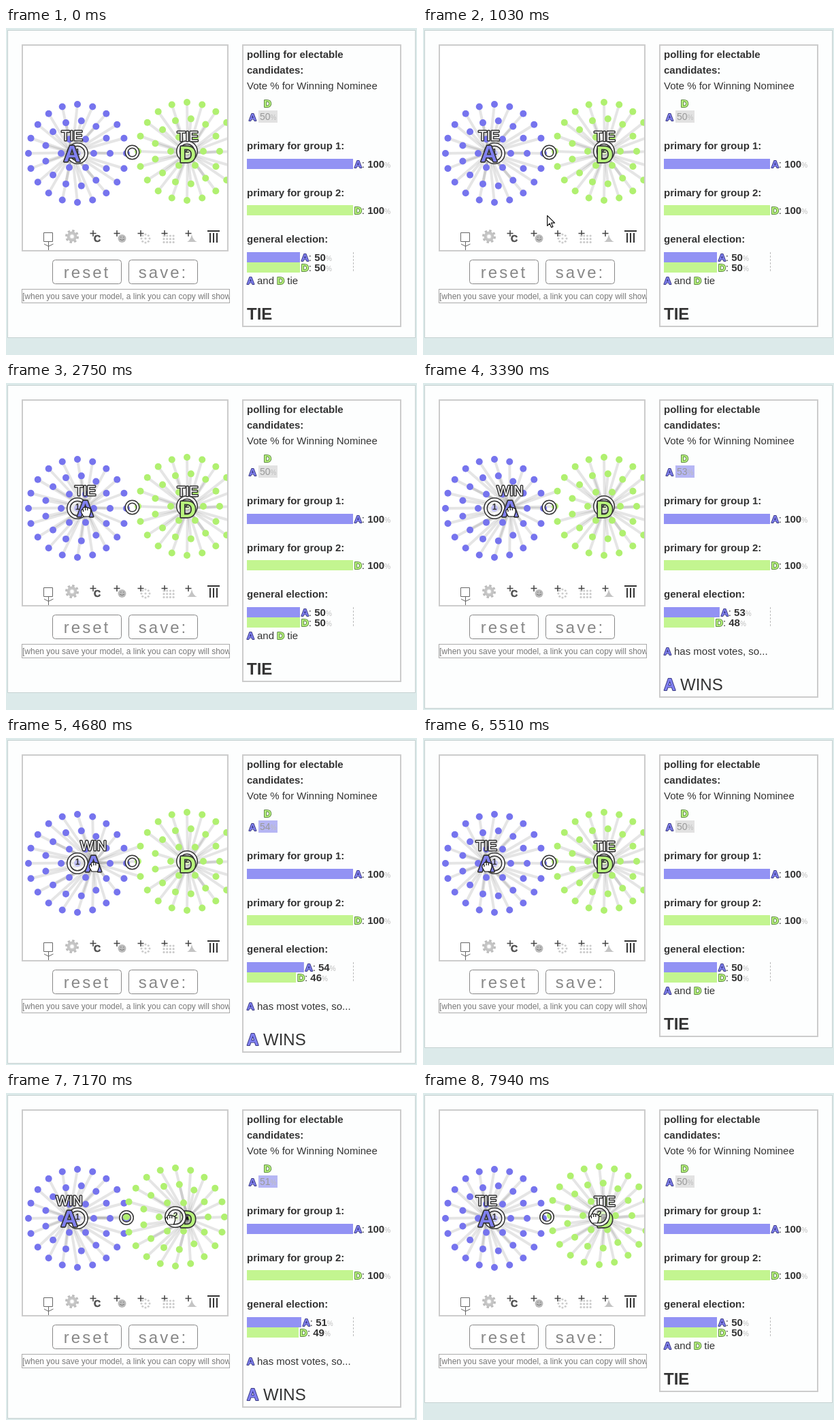
These frames come from a looping animation (604x480 px, 8000 ms). An HTML page:

```html
<!DOCTYPE html>
<html lang="en">
<head>
<meta charset="utf-8">
<title>Election model</title>
<style>
html, body { margin: 0; width: 100%; height: 100%; overflow: hidden; background: #dceaea; }
svg { display: block; font: 15px "Liberation Sans", Arial, sans-serif; fill: #333; }
.b { font-weight: bold; }
.pct { font-size: 10px; font-weight: normal; fill: #bbb; }
.letter, .tag { paint-order: stroke; stroke-linejoin: round; }
.letter { font-weight: bold; stroke-width: 2px; }
.A { fill: #8080f0; stroke: #3c3c86; }
.D { fill: #b8f47c; stroke: #5f8a45; }
.big { font-size: 34px; stroke: #333; stroke-width: 3.4px; text-anchor: middle; }
.tag { font-size: 20px; fill: #fff; stroke: #333; stroke-width: 3px; text-anchor: middle; }
.btn { font-size: 24px; letter-spacing: 3px; fill: #888; }
</style>
</head>
<body>
<svg id="stage" width="604" height="480" viewBox="0 0 604 480"></svg>
<script>
const LOOP = 8000;
const COLORS = { A: '#7674ee', D: '#b0f070' };
const BARS = { A: '#9292f4', D: '#c3f590' };
const candidateD = { x: 267, y: 184 };
const group1 = { x: 105, y: 184 };

// Moves are [start, end, steps, x, y]: the pointer was sampled, so motion is stepped.
const aMoves = [
  [2120, 2600, 5, 114, 183], [2750, 2870, 2, 119, 183], [3150, 3390, 3, 128, 183],
  [3820, 3940, 2, 129.4, 183], [4680, 4680, 1, 128.6, 183], [4800, 4800, 1, 127.9, 183],
  [4950, 5190, 3, 104, 183], [5340, 5340, 1, 98, 183], [5510, 5510, 1, 93, 183]
];
const groupMoves = [
  [6660, 6780, 2, 256, 183], [6930, 7170, 3, 249, 182],
  [7540, 7660, 2, 257, 181], [7810, 7940, 2, 259, 180]
];
const approachMoves = [
  [400, 760, 4, 180, 316], [910, 1150, 3, 184, 255], [1270, 1630, 4, 98, 186]
];
const crossMoves = [
  [5760, 6010, 3, 250, 208], [6150, 6270, 2, 249, 189], [6410, 6410, 1, 250, 183]
];

function follow(t, x, y, moves) {
  for (const [start, end, steps, toX, toY] of moves) {
    if (t < start) break;
    const step = t >= end ? steps : 1 + Math.floor((t - start) / (end - start) * (steps - 1));
    x += (toX - x) * step / steps;
    y += (toY - y) * step / steps;
    if (step < steps) break;
  }
  return { x, y };
}

function ring(radius, count) {
  return Array.from({ length: count }, (_, i) => {
    const angle = i * 2 * Math.PI / count;
    return { x: radius * Math.cos(angle), y: radius * Math.sin(angle) };
  });
}
const voters = [...ring(0, 1), ...ring(24, 6), ...ring(48, 13), ...ring(72, 20)];

const rect = (x, y, w, h, attrs) => `<rect x="${x}" y="${y}" width="${w}" height="${h}" ${attrs}/>`;
const circle = (x, y, r, attrs) => `<circle cx="${x}" cy="${y}" r="${r}" ${attrs}/>`;
const path = (d, attrs) => `<path d="${d}" ${attrs}/>`;
const text = (x, y, content, cls = '') => `<text x="${x}" y="${y}" class="${cls}">${content}</text>`;
const letter = name => `<tspan class="letter ${name}">${name}</tspan>`;
const share = n => `${n}<tspan class="pct">%</tspan>`;

function toolbar() {
  const plus = x => path(`M${x - 4.5} 301.5h9M${x} 297v9`, 'stroke="#444" stroke-width="1.5"');
  const dot = (x, y) => circle(x, y, 1.6, 'fill="#ccc"');
  const cloud = [...ring(0, 1), ...ring(6, 8)].map(p => dot(205 + p.x, 309 + p.y)).join('');
  const grid = Array.from({ length: 12 }, (_, i) => dot(232 + i % 4 * 4.7, 305 + Math.floor(i / 4) * 4.7)).join('');
  return path('M55.5 300.5h13v13h-13zM62.5 313v13M56 317l6.5 3.5 7-3.5', 'fill="none" stroke="#666"') +
    circle(97, 306, 8, 'fill="none" stroke="#bbb" stroke-width="4" stroke-dasharray="3.2 3.08"') +
    circle(97, 306, 5.5, 'fill="#ddd" stroke="#c4c4c4" stroke-width="4"') +
    circle(97, 306, 2.5, 'fill="#fff"') +
    [128, 163, 198, 233, 268].map(plus).join('') +
    `<text x="129" y="314" font-size="14" class="b" fill="#555" stroke="#444" stroke-width=".6">C</text>` +
    circle(170.5, 309, 6, 'fill="#bbb"') + path('M167 310q3.5 3 7 0M168 307h1.5M172 307h1.5', 'fill="none" stroke="#777"') +
    cloud + grid + path('M266 314q5-2 7-11 2 9 8 11z', 'fill="#c4c4c4"') +
    path('M296 298h18M300 301v14M305 301v14M310 301v14', 'fill="none" stroke="#333" stroke-width="2"');
}

function voteLines(group, A, counts) {
  let lines = '';
  for (const v of voters) {
    const x = group.x + v.x, y = group.y + v.y;
    const toA = Math.hypot(x - A.x, y - A.y) < Math.hypot(x - candidateD.x, y - candidateD.y);
    const choice = toA ? A : candidateD;
    counts[toA ? 'A' : 'D']++;
    lines += `M${x} ${y}L${choice.x} ${choice.y}`
      .replace(/.+/, d => path(d, 'stroke="#000" stroke-opacity=".1" stroke-width="4"'));
  }
  return lines;
}

function dots(group, color) {
  return voters.map(v => circle(group.x + v.x, group.y + v.y, 5, `fill="${color}"`)).join('');
}

function halo(x, y, r, width) {
  return circle(x, y, r, `fill="none" stroke="#333" stroke-width="${width + 3}"`) +
    circle(x, y, r, `fill="none" stroke="#fff" stroke-width="${width}"`);
}

function marker(group, number) {
  return circle(group.x, group.y, 12, 'fill="#fff" fill-opacity=".55"') + halo(group.x, group.y, 13, 3) +
    `<text x="${group.x}" y="${group.y + 1.5}" font-size="12" text-anchor="middle" class="b">${number}</text>`;
}

const candidate = (name, p, tag) => text(p.x, p.y + 12.5, name, `letter ${name} big`) +
  (tag ? text(p.x, p.y - 18, tag, 'tag') : '');

function pointer(t, A, group2) {
  if (t < 250) return '';
  let p, shape = 'fist';
  if (t < 2120) {
    p = follow(t, 78, 463, approachMoves);
    shape = t < 1630 ? 'arrow' : 'open';
  } else if (t < 5760) {
    p = { x: A.x + 0.5, y: A.y + 5 };
  } else if (t < 6660) {
    p = follow(t, A.x, A.y + 5, crossMoves);
    shape = t < 6270 ? 'arrow' : 'open';
  } else {
    p = { x: group2.x - 8, y: group2.y + 3 };
  }
  const outlines = {
    arrow: 'M0 0v15l3.5-3.3 2.4 5.6 2.4-1-2.4-5.5h5z',
    fist: 'M-3 8L-6.5 2V-1q1-2 2.5-1V-4q1.5-2.5 3.5-.8 1.8-1.6 3.2 .2 2-1 3 .8 1.8-.3 1.8 1.8V2L5.5 8zM-3.5-2v3M-.3-4v3M2.8-4v3',
    open: 'M-3 9.5L-7 2.5q1-2 3 0L-5-5q1.2-2 2.4 0L-1.2-7.5q1.5-2 2.4 0L2-6q1.6-1.8 2.6 .2V-3q1.6-1.5 2.4 .5V3L5 9.5zM-2.4-4.5V0M1.2-6V0M4.5-4V0'
  };
  return `<g transform="translate(${p.x} ${p.y})">` +
    path(outlines[shape], 'fill="#fff" stroke="#111" stroke-width="1.2" stroke-linejoin="round"') + '</g>';
}

function bar(name, y, fraction) {
  const width = 156 * fraction;
  return rect(354, y, width, 15, `fill="${BARS[name]}"`) +
    text(356 + width, y + 13, `${letter(name)}: <tspan class="b">${share(Math.round(fraction * 100))}</tspan>`);
}

function results(counts, win) {
  const total = counts.A + counts.D;
  const percentA = Math.round(counts.A / total * 100);
  const outcome = win
    ? text(354, 399, `${letter('A')} has most votes, so...`) +
      `<text x="354" y="451" font-size="24">${letter('A')} WINS</text>`
    : text(354, 376, `${letter('A')} and ${letter('D')} tie`) +
      `<text x="354" y="428" font-size="24" class="b">TIE</text>`;
  return text(354, 44, 'polling for electable', 'b') + text(354, 67, 'candidates:', 'b') +
    text(354, 90, 'Vote % for Winning Nominee') +
    text(379, 116, letter('D')) + text(357, 136, letter('A')) +
    rect(371, 121, 28, 18, `fill="${win ? '#b6b6f4' : '#e2e2e2'}"`) +
    `<text x="373" y="135" font-size="14" fill="#999">${share(percentA)}</text>` +
    text(354, 178, 'primary for group 1:', 'b') + bar('A', 192, 1) +
    text(354, 247, 'primary for group 2:', 'b') + bar('D', 260, 1) +
    text(354, 315, 'general election:', 'b') +
    path('M510.5 329v30', 'stroke="#bbb" stroke-dasharray="3 2"') +
    bar('A', 329, counts.A / total) + bar('D', 344, counts.D / total) + outcome;
}

const button = (x, label, textX) =>
  rect(x + .5, 340.5, 101, 35, 'rx="4" fill="#fff" stroke="#888"') + text(textX, 367, label, 'btn');

const controls = toolbar() + button(68, 'reset', 84.8) + button(180, 'save:', 194.8) +
  rect(23.5, 383.5, 305, 20, 'fill="#fff" stroke="#aaa"') +
  '<g clip-path="url(#field)"><text x="24" y="398" font-size="12" fill="#777">' +
  '[when you save your model, a link you can copy will show</text></g>';

function scene(t) {
  const A = follow(t, 97, 183, aMoves);
  const group2 = follow(t, 266, 181, groupMoves);
  const counts = { A: 0, D: 0 };
  const lines = voteLines(group1, A, counts) + voteLines(group2, A, counts);
  const win = counts.A > counts.D;
  const extra = win ? 23 : 0;
  const mark2 = marker(group2, 2);
  const D = candidate('D', candidateD, win ? '' : 'TIE');
  return '<defs><clipPath id="arena"><path d="M25 26h300v300h-300z"/></clipPath>' +
    '<clipPath id="field"><path d="M24 384h304v19h-304z"/></clipPath></defs>' +
    rect(2.5, 3.5, 599, 451 + extra, 'fill="#fdfefe" stroke="#c6d2d2"') +
    rect(24, 25, 302, 302, 'fill="#fff" stroke="#ccc" stroke-width="2"') +
    rect(348, 25, 232, 413 + extra, 'fill="#fdfefe" stroke="#ccc" stroke-width="2"') +
    '<g clip-path="url(#arena)">' + lines +
    dots(group1, COLORS.A) + dots(group2, COLORS.D) +
    marker(group1, 1) + halo((group1.x + group2.x) / 2, (group1.y + group2.y) / 2, 8.3, 2.4) +
    candidate('A', A, win ? 'WIN' : 'TIE') +
    (t < 6660 ? mark2 + D : D + mark2) + '</g>' +
    controls + results(counts, win) + pointer(t, A, group2);
}

const stage = document.getElementById('stage');
let shown = '';
function draw(now) {
  const next = scene(now % LOOP);
  if (next !== shown) stage.innerHTML = shown = next;
  requestAnimationFrame(draw);
}
draw(0);
</script>
</body>
</html>
```
